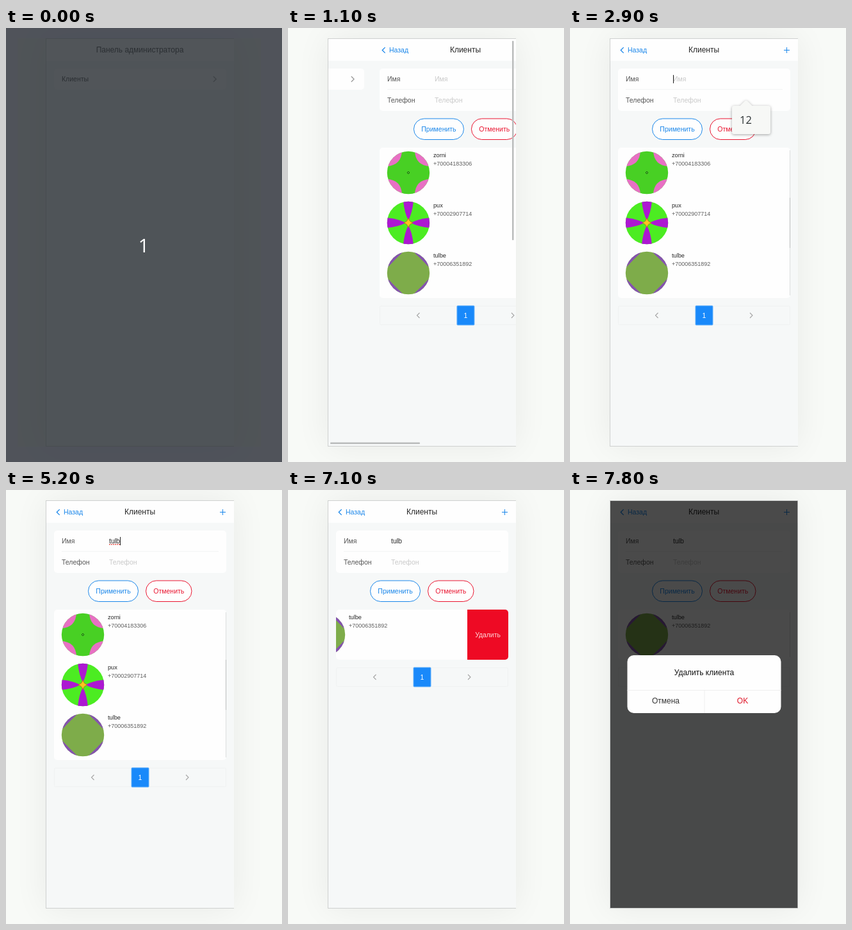
Write an HTML page with a canvas that moves like this. It is 431 px wide and 675 px high and loops after 8 s.

```html
<!DOCTYPE html>
<html lang="ru">
<head>
<meta charset="utf-8">
<title>Клиенты</title>
<style>
  html, body { margin: 0; width: 100%; height: 100%; overflow: hidden; background: #f8faf7; }
  canvas { display: block; width: 431px; height: 675px; }
</style>
</head>
<body>
<canvas id="stage" width="431" height="675"></canvas>
<script>
const ctx = document.getElementById('stage').getContext('2d');
const LOOP = 8000, STEP = 100, PAGE_W = 293;
const BLUE = '#1b87ea', RED = '#ea1530', PAGE = '#f6f8f8', DARK = '#262626';
const SANS = '"Liberation Sans", Arial, sans-serif';
const HUMAN = '"Open Sans", "Noto Sans", sans-serif';

const clients = [
  { name: 'zorni', phone: '+70004183306', avatar: pinkAvatar },
  { name: 'pux', phone: '+70002907714', avatar: petalAvatar },
  { name: 'tulbe', phone: '+70006351892', avatar: oliveAvatar }
];
const QUERY = 'tulb';

function text(str, x, y, size, color, align = 'left', family = SANS) {
  ctx.font = `${size}px ${family}`;
  ctx.fillStyle = color;
  ctx.textAlign = align;
  ctx.fillText(str, x, y);
}

function rect(x, y, w, h, color) {
  ctx.fillStyle = color;
  ctx.fillRect(x, y, w, h);
}

function roundRect(x, y, w, h, r, fill, stroke) {
  ctx.beginPath();
  ctx.roundRect(x, y, w, h, r);
  if (fill) { ctx.fillStyle = fill; ctx.fill(); }
  if (stroke) { ctx.strokeStyle = stroke; ctx.lineWidth = 1; ctx.stroke(); }
}

function line(points, color, width = 1) {
  ctx.beginPath();
  points.forEach(([x, y]) => ctx.lineTo(x, y));
  ctx.strokeStyle = color;
  ctx.lineWidth = width;
  ctx.stroke();
}

// dir is -1 for a chevron pointing left, 1 for right
function chevron(x, y, dir, size, color, width = 1.1) {
  const dx = dir * size / 2;
  line([[x - dx, y - size], [x + dx, y], [x - dx, y + size]], color, width);
}

function clipped(x, y, w, h, r, draw) {
  ctx.save();
  ctx.beginPath();
  ctx.roundRect(x, y, w, h, r);
  ctx.clip();
  draw();
  ctx.restore();
}

// Damped spring from 0 to 1, held at 1 once it arrives
function spring(seconds, mass, tension, friction) {
  if (seconds <= 0) return 0;
  const w = Math.sqrt(tension / mass);
  const z = friction / (2 * Math.sqrt(tension * mass));
  const wd = w * Math.sqrt(1 - z * z);
  const ratio = z * w / wd;
  if (wd * seconds >= Math.PI - Math.atan(1 / ratio)) return 1;
  const swing = Math.cos(wd * seconds) + ratio * Math.sin(wd * seconds);
  return 1 - Math.exp(-z * w * seconds) * swing;
}

// CSS "ease": cubic-bezier(.25, .1, .25, 1)
function ease(x) {
  if (x <= 0) return 0;
  if (x >= 1) return 1;
  const bezier = (a, b, u) => 3 * a * u * (1 - u) ** 2 + 3 * b * u * u * (1 - u) + u ** 3;
  let lo = 0, hi = 1;
  for (let i = 0; i < 20; i++) {
    const mid = (lo + hi) / 2;
    if (bezier(.25, .25, mid) < x) lo = mid; else hi = mid;
  }
  return bezier(.1, 1, lo);
}

function quarters(draw) {
  for (let i = 0; i < 4; i++) {
    draw();
    ctx.rotate(Math.PI / 2);
  }
}

function disc(color) {
  ctx.beginPath();
  ctx.arc(0, 0, 33.2, 0, Math.PI * 2);
  ctx.fillStyle = color;
  ctx.fill();
  ctx.clip();
}

function corners(edge, control, color) {
  ctx.fillStyle = color;
  quarters(() => {
    ctx.beginPath();
    ctx.moveTo(-edge, -34);
    ctx.quadraticCurveTo(-control, -control, -34, -edge);
    ctx.lineTo(-34, -34);
    ctx.fill();
  });
}

function pinkAvatar() {
  disc('#48d024');
  corners(10, 11, '#e870c4');
  line([[0, -2], [2, 0], [0, 2], [-2, 0], [0, -2]], '#1f5a18');
}

function petalAvatar() {
  disc('#4cec22');
  ctx.fillStyle = '#ad18d2';
  quarters(() => {
    ctx.beginPath();
    ctx.moveTo(-8, -34);
    ctx.quadraticCurveTo(-6, -15, 0, -4);
    ctx.quadraticCurveTo(6, -15, 8, -34);
    ctx.fill();
  });
  ctx.beginPath();
  ctx.moveTo(0, -7);
  quarters(() => ctx.quadraticCurveTo(1.5, -1.5, 7, 0));
  ctx.fillStyle = '#f8c81c';
  ctx.fill();
  ctx.strokeStyle = '#d8502a';
  ctx.lineWidth = .8;
  ctx.stroke();
}

function oliveAvatar() {
  disc('#7eac4a');
  corners(7, 21, '#8552b0');
}

function clientRow(client, x, y) {
  ctx.save();
  ctx.translate(x + 45, y + 39);
  client.avatar();
  ctx.restore();
  text(client.name, x + 84, y + 15, 9.2, DARK);
  text(client.phone, x + 84, y + 28, 9, '#5f5f5f');
}

function navbar(title) {
  rect(62, 17, 294, 34, '#fefefe');
  text(title, 209, 38, 12, DARK, 'center');
}

function adminPage() {
  rect(62, 17, 294, 634, PAGE);
  navbar('Панель администратора');
  roundRect(75, 63, 269, 33, 5, '#fefefe');
  text('Клиенты', 87, 83, 10.5, DARK);
  chevron(326, 79.5, 1, 4.2, '#999', 1.3);
}

function nameField(s) {
  if (s.typed) text(s.typed, 161, 83, 10.5, DARK);
  else text('Имя', 161, 83, 10.5, '#c9c9c9');
  const end = 161 + (s.typed ? ctx.measureText(s.typed).width : 0);
  if (s.misspelt) {
    for (let x = 161; x < end; x += 3) rect(x, 84, 2, 1.3, '#e0443c');
  }
  if (s.caret) rect(Math.round(end), 73, 1, 13, '#222');
}

function pagination(y) {
  roundRect(75.5, y + .5, 268, 29, 2, null, '#f0f2f2');
  chevron(135.5, y + 15, -1, 4, '#a4a4a4');
  chevron(283, y + 15, 1, 4, '#a4a4a4');
  roundRect(196, y, 27, 30, 1, '#1989fa', '#63b0fb');
  text('1', 209.5, y + 19, 10.5, '#fff', 'center');
}

function clientsPage(s) {
  rect(62, 17, 294, 634, PAGE);
  navbar('Клиенты');
  chevron(81.5, 34.5, -1, 4.4, BLUE, 1.3);
  text('Назад', 90, 38, 10.5, BLUE);
  line([[334, 34.5], [343, 34.5]], BLUE);
  line([[338.5, 30], [338.5, 39]], BLUE);

  roundRect(75, 63, 269, 66, 5, '#fefefe');
  rect(87, 95, 245, 1, '#f3f4f4');
  text('Имя', 87, 83, 10.5, '#555');
  text('Телефон', 87, 116, 10.5, '#555');
  text('Телефон', 161, 116, 10.5, '#c9c9c9');
  nameField(s);

  roundRect(128.5, 141, 78, 32.5, 16.25, '#fefefe', BLUE);
  text('Применить', 167.5, 161, 10.5, BLUE, 'center');
  roundRect(218.5, 141, 71.5, 32.5, 16.25, '#fefefe', RED);
  text('Отменить', 254.3, 161, 10.5, RED, 'center');

  const rows = s.filtered ? clients.slice(2) : clients;
  const height = 78 * rows.length;
  clipped(75, 186, 269, height, 5, () => {
    rect(75, 186, 269, height, '#fefefe');
    rows.forEach((c, i) => clientRow(c, 75 - s.swipe, 186 + 78 * i));
    if (s.swipe > 0) {
      rect(344 - s.swipe, 186, 65, 78, '#ee0a24');
      text('Удалить', 376 - s.swipe, 229, 10.4, '#ffd9dc', 'center');
    } else {
      rect(343, 190, 1, height - 8, '#dcdede');
      if (!s.filtered) rect(343, 264, 1, 78, '#bcbebe');
    }
  });
  pagination(186 + height + 12);
}

function scrollbars() {
  roundRect(66, 644.5, 140, 2.5, 1, '#b9bbbb');
  roundRect(350, 20, 2.5, 310, 1, '#b9bbbb');
}

function bubble(alpha) {
  ctx.save();
  ctx.globalAlpha = alpha;
  ctx.shadowColor = 'rgba(0,0,0,.35)';
  ctx.shadowBlur = 4;
  ctx.shadowOffsetY = 1;
  ctx.beginPath();
  ctx.roundRect(253, 121, 60, 44, 3);
  ctx.moveTo(265, 121.5);
  ctx.lineTo(273, 113.5);
  ctx.quadraticCurveTo(275, 112, 277, 113.5);
  ctx.lineTo(285, 121.5);
  ctx.fillStyle = '#f7f8f6';
  ctx.fill();
  ctx.shadowColor = 'transparent';
  text('12', 265, 149, 16.5, '#2e3436', 'left', HUMAN);
  ctx.restore();
}

function dialog(p) {
  ctx.save();
  ctx.globalAlpha = p;
  ctx.translate(209.5, 302);
  ctx.scale(.8 + .2 * p, .8 + .2 * p);
  roundRect(-120, -45, 240, 90, 10, '#fefefe');
  rect(-120, 9, 240, 1, '#eee');
  rect(0, 9, 1, 36, '#eee');
  text('Удалить клиента', 0, -14, 12, '#111', 'center');
  text('Отмена', -60, 30, 12, '#333', 'center');
  text('OK', 60, 30, 12, '#df1426', 'center');
  ctx.restore();
}

function countdown() {
  rect(0, 0, 431, 675, 'rgba(43,48,53,.82)');
  ctx.fillStyle = 'rgba(80,78,105,.18)';
  ctx.beginPath();
  ctx.rect(0, 0, 431, 675);
  ctx.rect(18, 16, 380, 635);
  ctx.fill('evenodd');
  text('1', 215, 348.5, 30, '#fff', 'center', HUMAN);
}

function backdrop() {
  rect(0, 0, 431, 675, '#f8faf7');
  ctx.save();
  ctx.shadowColor = 'rgba(0,0,0,.065)';
  ctx.shadowBlur = 50;
  rect(62, 16, 294, 635, PAGE);
  ctx.restore();
}

function stateAt(t) {
  const chars = t < 3900 ? 0 : t < 4000 ? 1 : t < 4100 ? 3 : 4;
  const blinkFrom = t < 3900 ? 2900 : 4100;
  const focused = t >= 2900 && t < 5600;
  const closing = spring((t - 7110) / 1000, 1, 250, 30);
  return {
    slide: ease((t - 913) / 400),
    typed: QUERY.slice(0, chars),
    caret: focused && (t < blinkFrom || Math.floor((t - blinkFrom) / 500) % 2 === 0),
    misspelt: t >= 5200 && t < 5600,
    filtered: t >= 5700,
    swipe: t < 6400 ? 0 : t < 6500 ? 34 : 64 * (1 - closing),
    bubble: t < 2900 ? 0 : Math.max(0, Math.min(1, (4200 - t) / 300)),
    mask: .705 * closing,
    dialog: spring((t - 7110) / 1000, 1.2, 200, 25)
  };
}

function draw(t) {
  const s = stateAt(t);
  backdrop();
  clipped(62, 16, 294, 635, 0, () => {
    const offset = PAGE_W * s.slide;
    if (s.slide < 1) {
      ctx.save();
      ctx.translate(-offset, 0);
      adminPage();
      ctx.restore();
    }
    if (s.slide > 0) {
      ctx.save();
      ctx.translate(PAGE_W - offset, 0);
      clientsPage(s);
      ctx.restore();
    }
    if (t >= 900 && t < 1400) scrollbars();
  });
  rect(62, 16, 294, 1, '#cfd1d0');
  rect(62, 16, 1, 635, '#cfd1d0');
  rect(62, 650, 294, 1, '#cfd1d0');

  if (s.bubble > 0) bubble(s.bubble);
  if (s.mask > 0) rect(63, 17, 292.5, 633, `rgba(0,0,0,${s.mask})`);
  if (s.dialog > 0) dialog(s.dialog);
  if (t < 100) countdown();
}

const start = performance.now();
function tick() {
  const t = (performance.now() - start) % LOOP;
  draw(Math.floor(t / STEP) * STEP);
  requestAnimationFrame(tick);
}
tick();
</script>
</body>
</html>
```
